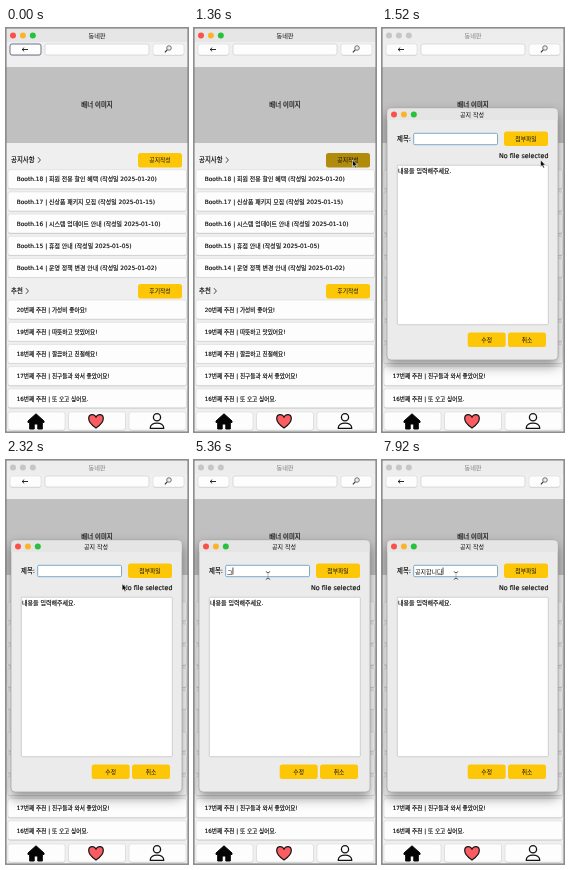
Write an HTML page that moves like this. It is 182 by 404 pixels and loops after 8 s.

```html
<!DOCTYPE html>
<html>
<head>
<meta charset="utf-8">
<style>
html, body { margin: 0; width: 100%; height: 100%; overflow: hidden; background: #ececec; }
svg { display: block; width: 182px; height: 404px; }
text { font: 6px "DejaVu Sans", "Noto Sans CJK KR", "Noto Sans CJK", sans-serif; fill: #080808; dominant-baseline: central; white-space: pre; }
.strong { stroke: #080808; stroke-width: .15; }
</style>
</head>
<body>
<svg id="stage" viewBox="0 0 182 404"></svg>
<script>
const LOOP = 8000;
const PRESS = 1280, DIALOG = 1440, CONTENT = 1520, MOVE = 1920, ARRIVE = 2720;
const YELLOW = '#fdc708';

// time, typed text, caret shown
const typing = [
  [0, '', false], [5360, 'ㄱ', true], [5440, '고', true], [5680, '공', true],
  [5840, '공ㅈ', true], [5920, '공지', true], [6160, '공지ㅎ', true],
  [6640, '공지하', true], [6960, '공지합', true], [7280, '공지합니', true],
  [7440, '공지합니다', false], [7920, '공지합니다', true]
];
const notices = [
  'Booth.18 | 회원 전용 할인 혜택 (작성일 2025-01-20)',
  'Booth.17 | 신상품 패키지 모집 (작성일 2025-01-15)',
  'Booth.16 | 시스템 업데이트 안내 (작성일 2025-01-10)',
  'Booth.15 | 휴점 안내 (작성일 2025-01-05)',
  'Booth.14 | 운영 정책 변경 안내 (작성일 2025-01-02)'
];
const reviews = [
  '20번째 추천 | 가성비 좋아요!', '19번째 추천 | 따뜻하고 맛있어요!',
  '18번째 추천 | 깔끔하고 친절해요!', '17번째 추천 | 친구들과 와서 좋았어요!',
  '16번째 추천 | 또 오고 싶어요.'
];

const rect = (x, y, w, h, fill, r = 0, more = '') =>
  `<rect x="${x}" y="${y}" width="${w}" height="${h}" rx="${r}" fill="${fill}" ${more}/>`;
const label = (x, y, s, size = 6, anchor = 'start', more = 'class="strong"') =>
  `<text x="${x}" y="${y}" text-anchor="${anchor}" style="font-size:${size}px" ${more}>${s}</text>`;
const card = (x, y, w, h, r = 2) =>
  rect(x, y + .6, w, h, '#c4c4c4', r) + rect(x, y, w, h, '#fdfdfd', r, 'stroke="#d2d2d2" stroke-width=".5"');
const button = (x, y, w, h, s, id = '') =>
  rect(x, y, w, h, YELLOW, 2.5, id && `id="${id}"`) + label(x + w / 2, y + h / 2, s, 5.8, 'middle', '');
const heading = (y, s, arrowX) => label(5, y, s, 6.4) +
  `<path d="M${arrowX} ${y - 2.8}l2.4 2.8l-2.4 2.8" fill="none" stroke="#222" stroke-width=".8"/>`;
const lights = (x, y, colors) =>
  colors.map((c, i) => `<circle cx="${x + i * 9.9}" cy="${y}" r="3" fill="${c}"/>`).join('');
const list = (top, rows, size) =>
  rows.map((s, i) => card(2, top + i * 22.2, 178.5, 19) + label(10.7, top + 9.7 + i * 22.2, s, size)).join('');
const bright = ['#fb514b', '#f9b42c', '#28c13e'];

const icons = `
  <path d="M16.2 21.5H22M18.2 19.6L16.2 21.5L18.2 23.4" fill="none" stroke="#111" stroke-width=".9"/>
  <circle cx="163" cy="20" r="2.3" fill="#e4edf1" stroke="#444" stroke-width=".7"/>
  <path d="M161.2 21.8L158.9 24.3" stroke="#333" stroke-width="1.2"/>
  <path d="M30 385.8L22 393V394.5H23.7V401H28.2V396H31.8V401H36.3V394.5H38V393Z" fill="#050505" stroke="#050505" stroke-linejoin="round"/>
  <path d="M90 400C85.5 397 82.7 394 82.7 390.5C82.7 385.5 88.5 385.5 90 389C91.5 385.5 97.3 385.5 97.3 390.5C97.3 394 94.5 397 90 400Z" fill="#fb5c62" stroke="#111" stroke-width="1.2"/>
  <circle cx="151" cy="389.2" r="3.6" fill="none" stroke="#111" stroke-width="1.3"/>
  <path d="M144.2 400.3C144.2 393.3 157.8 393.3 157.8 400.3Z" fill="none" stroke="#111" stroke-width="1.3" stroke-linejoin="round"/>`;

const main = rect(0, 0, 182, 404, '#efefef') +
  rect(0, 0, 182, 14, '#e6e6e6', 0, 'id="bar"') +
  `<g id="lights">${lights(7, 7.5, bright)}</g>` +
  `<g id="dimLights">${lights(7, 7.5, ['#c6c6c6', '#c6c6c6', '#c6c6c6'])}</g>` +
  `<g id="title">${label(91, 7, '동네판', 6.2, 'middle', '')}</g>` +
  card(4, 16, 31, 11) + rect(4, 16, 31, 11, 'none', 2, 'id="ring" stroke="#5b6078" stroke-width=".8"') +
  rect(39, 16, 104, 11, '#fdfdfd', 2, 'stroke="#c8c8c8" stroke-width=".6"') + card(147, 16, 31, 11) +
  rect(0, 39, 182, 76, '#c0c0c0') + label(91, 77, '배너 이미지', 6.4, 'middle') +
  heading(132, '공지사항', 32) + button(132, 125, 44, 14.5, '공지작성', 'write') + list(141.7, notices, 5.9) +
  heading(263, '추천', 20) + button(132, 256, 44, 14.5, '후기작성') + list(272, reviews, 5.65) +
  [2, 62.5, 123].map(x => card(x, 384, 57, 18)).join('') + icons +
  rect(0, 0, 182, 404, 'none', 0, 'stroke="#777"');

const form = label(15, 111, '제목:', 6.4) +
  rect(31.7, 105.3, 83.8, 11.4, '#fff', 1.2, 'stroke="#5c97bb" stroke-width=".8"') +
  '<text id="typed" x="33" y="111"></text>' +
  rect(0, 107.5, .8, 7, '#222', 0, 'id="caret"') +
  rect(0, 114.2, 5, .6, '#333', 0, 'id="underline"') +
  button(122, 103.5, 44, 14.5, '첨부파일') + label(166.5, 128, 'No file selected', 6.4, 'end') +
  rect(15.3, 137.2, 151, 159.5, '#fff', 1, 'stroke="#bdbdbd" stroke-width=".7"') +
  label(16, 142, '내용을 입력해주세요.') +
  button(85.7, 304.5, 38, 14.5, '수정') + button(126, 304.5, 38, 14.5, '취소');

const dialog = rect(5, 80, 171, 252, '#ebebeb', 4, 'stroke="#a2a2a2" stroke-width=".7" style="filter:drop-shadow(0 6px 6px #0006)"') +
  '<path d="M5.4 92V84Q5.4 80.4 9 80.4H172Q175.6 80.4 175.6 84V92Z" fill="#e5e5e5"/>' +
  lights(12, 86.5, bright) + label(90, 86.3, '공지 작성', 6, 'middle', '') + `<g id="form">${form}</g>`;

const cursors = `
  <path id="arrow" d="M0 0V6.8L1.6 5.4L2.7 8L4 7.4L2.9 5H5Z" fill="#080808" stroke="#fff" stroke-width=".6"/>
  <g id="beam" fill="none" stroke="#333">
    <path d="M-2.2 -4L0 -2.6L2.2 -4M-2.2 4L0 2.6L2.2 4" stroke-width=".8"/>
    <path d="M0 -2.6V2.6" stroke-width=".3"/>
  </g>`;

stage.innerHTML = main + `<g id="dialog">${dialog}</g>` + cursors;
const $ = id => document.getElementById(id);
const show = (id, on) => $(id).style.display = on ? '' : 'none';
const place = (id, x, y) => $(id).setAttribute('transform', `translate(${x} ${y})`);
const ease = p => p * p * (3 - 2 * p);
const progress = (t, a, b) => ease(Math.min(1, Math.max(0, (t - a) / (b - a))));
const mix = (a, b, p) => a + (b - a) * p;

function render(t) {
  const open = t >= DIALOG;
  show('dialog', open);
  show('form', t >= CONTENT);
  show('lights', !open);
  show('dimLights', open);
  show('ring', t < PRESS);
  $('title').setAttribute('opacity', open ? .5 : 1);
  $('bar').setAttribute('fill', open ? '#ededed' : '#e6e6e6');
  $('write').setAttribute('fill', t >= PRESS && !open ? '#b18b0c' : YELLOW);

  const enter = progress(t, 0, 640), go = progress(t, MOVE, ARRIVE);
  const x = mix(mix(186, 158.5, enter), 74, go);
  const y = mix(mix(215, 132, enter), 115.5, go);
  const overField = open && x < 115.5 && y < 117;
  show('arrow', !overField);
  show('beam', overField);
  place('arrow', x, y);
  place('beam', x, y);

  const [, word, caretOn] = typing.filter(step => step[0] <= t).pop();
  const typed = $('typed');
  if (typed.textContent !== word) typed.textContent = word;
  const end = 33 + (word ? typed.getComputedTextLength() : 0);
  $('caret').setAttribute('x', end);
  $('underline').setAttribute('x', end - 5.2);
  show('caret', caretOn);
  show('underline', word);
}

const start = performance.now();
function tick() {
  render((performance.now() - start) % LOOP);
  requestAnimationFrame(tick);
}
tick();
</script>
</body>
</html>
```
